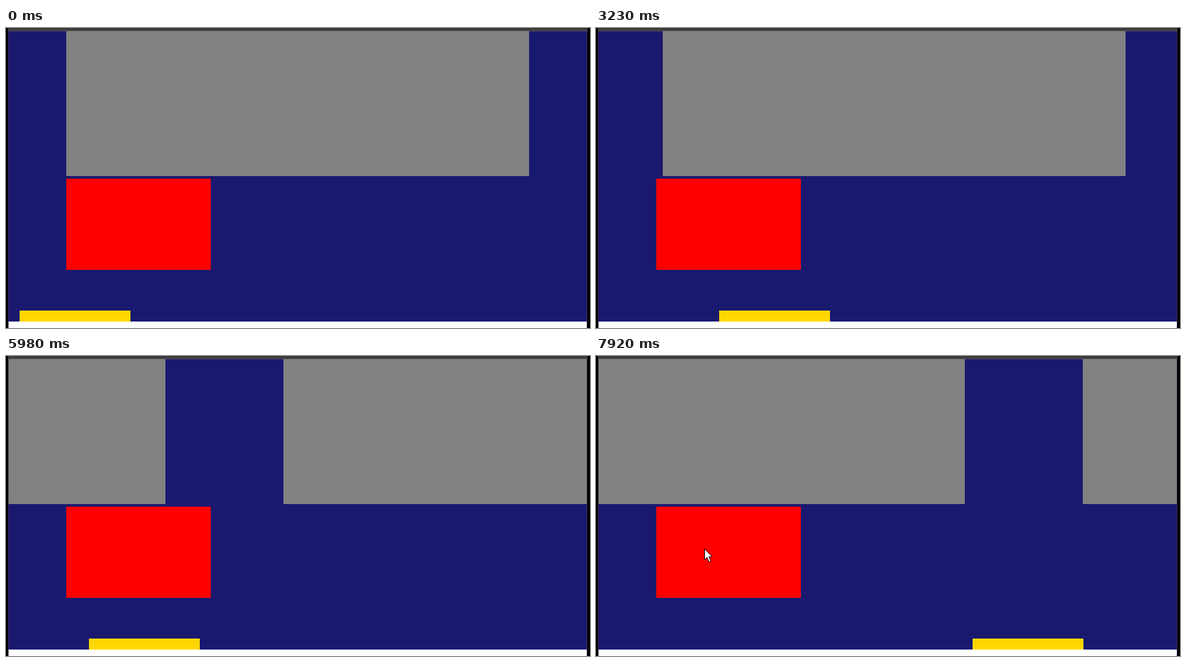
An HTML page with a canvas that plays this animation: 901x464 px, repeating every 8 s.

```html
<!DOCTYPE html>
<html lang="en">
<head>
<meta charset="utf-8">
<title>Snap carousel</title>
<style>
  html, body { margin: 0; width: 100%; height: 100%; overflow: hidden; background: #000; }
  canvas { display: block; }
</style>
</head>
<body>
<canvas id="stage" width="901" height="464"></canvas>
<script>
const ctx = document.getElementById("stage").getContext("2d");
const LOOP = 8000;
const PITCH = 896;

const smooth = u => u * u * (3 - 2 * u);
const easeOut = u => 1 - (1 - u) ** 2;
const speedUp = u => u ** 1.6;

// Each scroll gesture is shown in a few held steps; "from" is its first visible position.
const gestures = [
  { start: 700, end: 900, steps: 3, from: 10, to: 230, ease: easeOut },
  { start: 1090, end: 1370, steps: 4, from: 200, to: 0, ease: smooth },
  { start: 2170, end: 2840, steps: 8, from: 5, to: PITCH, ease: smooth },
  { start: 3230, end: 3800, steps: 7, from: 886, to: 0, ease: smooth },
  { start: 5600, end: 6380, steps: 9, from: 10, to: 1752, ease: smooth },
  { start: 6560, end: 6650, steps: 2, from: 1772, to: 2 * PITCH, ease: smooth },
  { start: 7440, end: 7920, steps: 6, from: 1800, to: 2926, ease: speedUp },
];

function scrollAt(time) {
  const g = gestures.filter(g => g.start <= time).pop();
  if (!g) return 0;
  const last = g.steps - 1;
  const step = Math.min(last, Math.floor((time - g.start) / (g.end - g.start) * last + 1e-6));
  return Math.round(g.from + (g.to - g.from) * g.ease(step / last));
}

function rect(color, x, y, w, h) {
  ctx.fillStyle = color;
  ctx.fillRect(x, y, w, h);
}

function drawPointer(x, y) {
  const arrow = new Path2D(`M${x + .5} ${y + .5}v16.5l3.8 -3.6l3 7l2.9 -1.2l-3 -6.8h5z`);
  ctx.fillStyle = "#fff";
  ctx.fill(arrow);
  ctx.strokeStyle = "#000";
  ctx.lineWidth = 1;
  ctx.stroke(arrow);
}

function draw(time) {
  const scroll = scrollAt(time);

  // Window edges
  rect("#000", 0, 0, 901, 464);
  rect("#3b2540", 3, 0, 894, 464);
  rect("#3c3c3c", 3, 0, 894, 4);
  rect("#5a5a5a", 3, 4, 894, 1);
  rect("#fff", 4, 454, 892, 10);

  // Carousel
  ctx.save();
  ctx.beginPath();
  ctx.rect(4, 5, 892, 449);
  ctx.clip();
  rect("#191970", 4, 5, 892, 449);
  for (let i = 0; i < 5; i++) rect("#828282", 93 + i * PITCH - scroll, 5, 714, 224);
  rect("#f00", 93, 233, 223, 141);
  rect("#ffd700", Math.floor(21.05 + scroll * 0.1914), 437, 171, 17);
  ctx.restore();

  if (time >= 7920) drawPointer(167, 298);
}

const origin = performance.now();
function tick() {
  draw((performance.now() - origin) % LOOP);
  requestAnimationFrame(tick);
}
tick();
</script>
</body>
</html>
```
